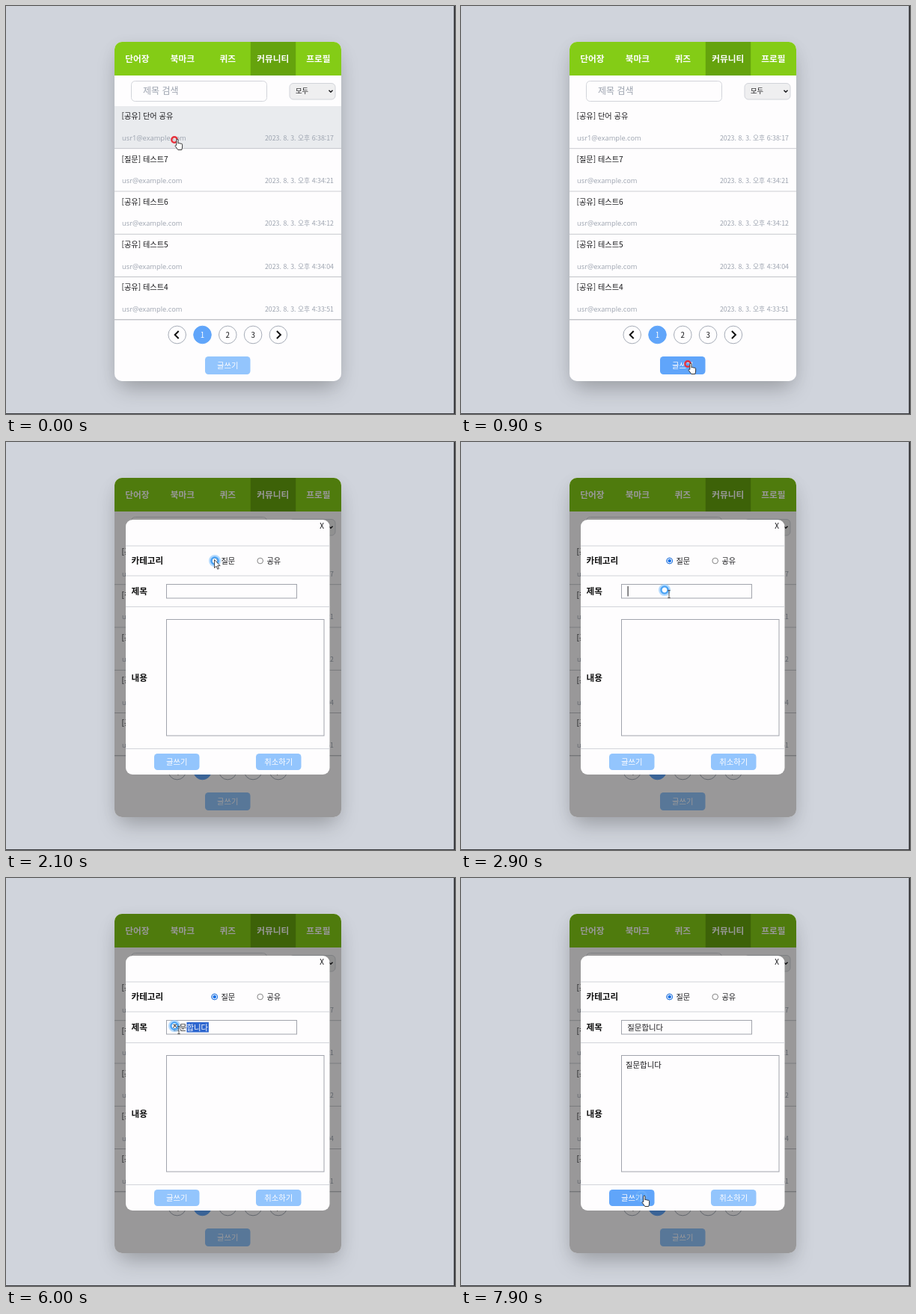
An HTML page for the animation above (8000 ms loop, 600 by 546 pixels).

```html
<!DOCTYPE html>
<html lang="ko">
<head>
<meta charset="utf-8">
<title>커뮤니티 글쓰기</title>
<style>
  html, body { margin: 0; width: 100%; height: 100%; overflow: hidden; background: #d0d4dc; }
  #stage { position: relative; width: 600px; height: 546px; overflow: hidden; }
  #shadow { position: absolute; left: 145px; top: 48px; width: 303px; height: 454px; border-radius: 10px;
    box-shadow: 0 15px 30px -7px rgba(0, 0, 0, .25), 0 4px 22px rgba(0, 0, 0, .05); }
  svg { position: absolute; left: 0; top: 0; }
  text { font-family: 'Noto Sans CJK KR', 'Noto Sans CJK', 'Noto Sans', sans-serif; white-space: pre; }
  .latin { font-family: 'Open Sans', 'Noto Sans', sans-serif; }
</style>
</head>
<body>
<div id="stage"><div id="shadow"></div><svg id="art" width="600" height="546" viewBox="0 0 600 546"></svg></div>
<script>
const LOOP = 8000, STEP = 100;
const WHITE = '#fefdfe', INK = '#18181b', MUTED = '#9ca3af', BLUE = '#60a5fa', PALE = '#93c5fd', LINE = '#d2d4da';
const art = document.getElementById('art');

function add(parent, tag, attrs, content = '') {
  const el = document.createElementNS('http://www.w3.org/2000/svg', tag);
  for (const key in attrs) el.setAttribute(key, attrs[key]);
  el.textContent = content;
  return parent.appendChild(el);
}
const group = parent => add(parent, 'g', {});
const box = (parent, x, y, width, height, fill, more = {}) =>
  add(parent, 'rect', { x, y, width, height, fill, ...more });
const path = (parent, d, stroke, width, fill = 'none') =>
  add(parent, 'path', { d, stroke, 'stroke-width': width, fill });
// y is the visual middle of the line
const label = (parent, x, y, size, fill, content, more = {}) =>
  add(parent, 'text', { x, y: y + size * .37, 'font-size': size, fill, ...more }, content);
const middle = { 'text-anchor': 'middle' }, bold = { 'font-weight': 700 };
const show = (el, on) => el.setAttribute('visibility', on ? 'visible' : 'hidden');

function button(parent, x, y, height, content) {
  const face = box(parent, x, y, 60.5, height, PALE, { rx: 4.5 });
  label(parent, x + 30.2, y + height / 2, 10.3, WHITE, content, middle);
  return face;
}

// Board
const card = group(art);
const clip = add(add(art, 'defs', {}), 'clipPath', { id: 'round' });
box(clip, 145, 48, 303, 454, '#000', { rx: 10 });
card.setAttribute('clip-path', 'url(#round)');
box(card, 145, 48, 303, 454, WHITE);
box(card, 145, 48, 303, 45, '#84cc16');
box(card, 326.8, 48, 60.4, 45, '#65a30d');
['단어장', '북마크', '퀴즈', '커뮤니티', '프로필'].forEach((name, i) =>
  label(card, 175.3 + i * 60.5, 70.5, 11.7, WHITE, name, { ...middle, ...bold }));

box(card, 167.5, 100.5, 181, 27, WHITE, { rx: 5, stroke: LINE });
label(card, 183, 114, 12, MUTED, '제목 검색');
box(card, 379, 103.5, 61, 21.5, '#efeff0', { rx: 5, stroke: LINE });
label(card, 387, 114, 9.3, INK, '모두');
path(card, 'M431.5 112.7l2.5 2.6 2.5-2.6', INK, 1.4);

const ROW_TOP = 134, ROW = 57.2;
const rows = [
  ['[공유] 단어 공유', 'usr1', '6:38:17'],
  ['[질문] 테스트7', 'usr', '4:34:21'],
  ['[공유] 테스트6', 'usr', '4:34:12'],
  ['[공유] 테스트5', 'usr', '4:34:04'],
  ['[공유] 테스트4', 'usr', '4:33:51']
].map(([title, user, clock], i) => {
  const y = ROW_TOP + i * ROW;
  const face = box(card, 145, y, 303, ROW, WHITE);
  label(card, 154.5, y + 13.7, 10.2, INK, title);
  label(card, 155, y + 42.5, 9.3, MUTED, user + '@example.com', { class: 'latin' });
  label(card, 438, y + 42.8, 8.8, MUTED, '2023. 8. 3. 오후 ' + clock, { 'text-anchor': 'end' });
  box(card, 145, y + ROW - .7, 303, 1, '#a9acb3');
  return face;
});

['', '1', '2', '3', ''].forEach((digit, i) => {
  const cx = 228.7 + i * 33.8, on = i === 1;
  add(card, 'circle', { cx, cy: 440, r: 11.8, fill: on ? BLUE : WHITE, stroke: on ? BLUE : MUTED, 'stroke-width': .9 });
  if (digit) label(card, cx, 440, 9.8, on ? WHITE : INK, digit, middle);
  else path(card, i ? `M${cx - 2} 435l5 5-5 5` : `M${cx + 2} 435l-5 5 5 5`, '#111', 2);
});
const openButton = button(card, 266, 469, 24, '글쓰기');

// Dialog
const dialog = group(art);
box(dialog, 145, 48, 303, 454, '#000', { rx: 10, opacity: .4 });
box(dialog, 160, 104, 272.5, 341, WHITE, { rx: 9 });
label(dialog, 422, 112, 10, INK, 'X', middle);
[138.5, 178.5, 220, 410].forEach(y => box(dialog, 160, y, 272.5, 1, LINE));
[['카테고리', 159], ['제목', 200], ['내용', 316]].forEach(([name, y]) =>
  label(dialog, 167.5, y, 11.6, '#111', name, bold));
const [dot] = [[278.7, '질문'], [339.7, '공유']].map(([cx, name]) => {
  add(dialog, 'circle', { cx, cy: 159, r: 3.8, fill: WHITE, stroke: '#777', 'stroke-width': .9 });
  label(dialog, cx + 8.8, 159, 10.2, INK, name);
  const mark = group(dialog);
  add(mark, 'circle', { cx, cy: 159, r: 3.8, fill: WHITE, stroke: '#1a73e8', 'stroke-width': 1.1 });
  add(mark, 'circle', { cx, cy: 159, r: 2.3, fill: '#1a73e8' });
  show(mark, false);
  return mark;
});
box(dialog, 214.5, 190.5, 174, 18.5, WHITE, { stroke: '#a1a4ac' });
box(dialog, 214.5, 237.5, 210.5, 155.5, WHITE, { stroke: '#a1a4ac' });
const sendButton = button(dialog, 198, 417, 22, '글쓰기');
button(dialog, 334, 417, 22, '취소하기');

const TYPE_X = 222.3, GLYPH = 9.6;
const selection = box(dialog, TYPE_X, 193, 0, 13.5, '#2d66cf');
const title = label(dialog, TYPE_X, 200, 10.4, INK, '');
const plain = add(title, 'tspan', {}), picked = add(title, 'tspan', { fill: '#fff' });
const underline = box(dialog, 0, 205.3, GLYPH, .8, INK);
const caret = box(dialog, 0, 193, 1, 13.5, INK);
const bodyText = label(dialog, 220, 250, 10.4, INK, '질문합니다');

// Dark edges of the screen
box(art, 598.5, 0, 1.5, 546, '#26272b');
box(art, 0, 545, 600, 1, '#3a3b40');

// Pointer
const pointer = group(art);
const halo = add(pointer, 'circle', { r: 6, fill: 'none', stroke: '#8cc8ff', 'stroke-width': 4, opacity: .65 });
const ring = add(pointer, 'circle', { r: 3.7, fill: 'none', 'stroke-width': 2.4 });
const shapes = { hand: group(pointer), beam: group(pointer), arrow: group(pointer) };
path(shapes.hand, 'M2 1.3a1.1 1.1 0 0 1 2.2 0V6l.3-.2a1 1 0 0 1 1.8.4 1 1 0 0 1 1.8.4 1 1 0 0 1 1.7.8V11L9 14.5H4L.3 9.4a1 1 0 0 1 1.7-.9z', '#222', .9, '#fff');
shapes.hand.setAttribute('transform', 'translate(.8 -1)');
path(shapes.beam, 'M4.3 .5h3.4M6 .5v10M4.3 10.5h3.4', '#444', .9);
path(shapes.arrow, 'M-.5-1.5v11l2.5-2.3 1.8 4 1.7-.8-1.8-3.8h3.4z', '#222', .8, '#fff');

const moves = [
  [0, 225, 179], [500, 218, 362], [900, 303, 479], [1200, 303, 478], [1300, 302, 464],
  [1500, 300, 440], [2000, 279, 159], [2300, 279, 159], [2600, 272, 198], [5900, 272, 198],
  [6000, 225, 198], [6100, 219, 198], [6400, 219, 198], [6700, 268, 290], [7100, 268, 290],
  [7400, 241, 426], [8000, 241, 426]
];
const clicks = [[1100, 1400], [2100, 2400], [2800, 3100], [5900, 6200], [6700, 6900], [7800, 8000]];
const typing = [[0, ''], [3600, 'ㅈ'], [3700, '지'], [4000, '질'], [4200, '질ㅁ'], [4300, '질무'], [4500, '질문'],
  [4700, '질문ㅎ'], [4800, '질문하'], [4900, '질문합'], [5000, '질문합니'], [5100, '질문합니다']];

function place(t) {
  const i = moves.findIndex(m => m[0] > t);
  const [t0, x0, y0] = moves[i - 1], [t1, x1, y1] = moves[i];
  const k = (t - t0) / (t1 - t0);
  return [x0 + (x1 - x0) * k, y0 + (y1 - y0) * k];
}

function draw(t) {
  const [x, y] = place(t);
  const within = (l, top, r, b) => x >= l && x <= r && y >= top && y <= b;
  const open = t >= 1200;

  rows.forEach((row, i) => {
    const on = !open && Math.floor((y - ROW_TOP) / ROW) === i;
    row.setAttribute('fill', on ? '#e9ebee' : WHITE);
  });
  openButton.setAttribute('fill', t < 1300 && y > 469 ? BLUE : t === 1300 ? '#78b4fb' : PALE);
  show(dialog, open);

  const overSend = open && within(198, 417, 258, 439);
  sendButton.setAttribute('fill', overSend ? BLUE : PALE);
  dot.setAttribute('visibility', t >= 2200 ? 'inherit' : 'hidden');

  const text = typing.filter(s => s[0] <= t).pop()[1], n = text.length;
  const from = t < 6000 || t >= 6700 ? n : t < 6100 ? 2 : 0;
  plain.textContent = text.slice(0, from);
  picked.textContent = text.slice(from);
  selection.setAttribute('x', TYPE_X + from * GLYPH);
  selection.setAttribute('width', (n - from) * GLYPH + (from < n ? .6 : 0));

  const end = TYPE_X + n * GLYPH;
  underline.setAttribute('x', end - GLYPH);
  underline.setAttribute('visibility', n && t < 5700 ? 'inherit' : 'hidden');
  caret.setAttribute('x', end + .3);
  caret.setAttribute('visibility', (t >= 2800 && t < 3200) || (t >= 3600 && t < 5700) ? 'inherit' : 'hidden');
  bodyText.setAttribute('visibility', t >= 7000 ? 'inherit' : 'hidden');

  const down = clicks.some(([a, b]) => t >= a && t < b);
  ring.setAttribute('stroke', down ? '#4aa3f5' : '#e8323c');
  ring.setAttribute('r', down ? 4.6 : 3.7);
  show(halo, down);
  ring.setAttribute('opacity', down && overSend ? .35 : 1);
  halo.setAttribute('opacity', down && overSend ? .25 : .65);

  const inField = open && (within(214, 190, 389, 209) || within(214, 237, 425, 393));
  const kind = !open || overSend ? 'hand' : inField ? 'beam' : 'arrow';
  for (const name in shapes) show(shapes[name], name === kind);
  pointer.setAttribute('transform', `translate(${x} ${y})`);
}

const start = performance.now();
function tick() {
  const t = (performance.now() - start) % LOOP;
  draw(Math.floor(t / STEP) * STEP);
  requestAnimationFrame(tick);
}
tick();
</script>
</body>
</html>
```
